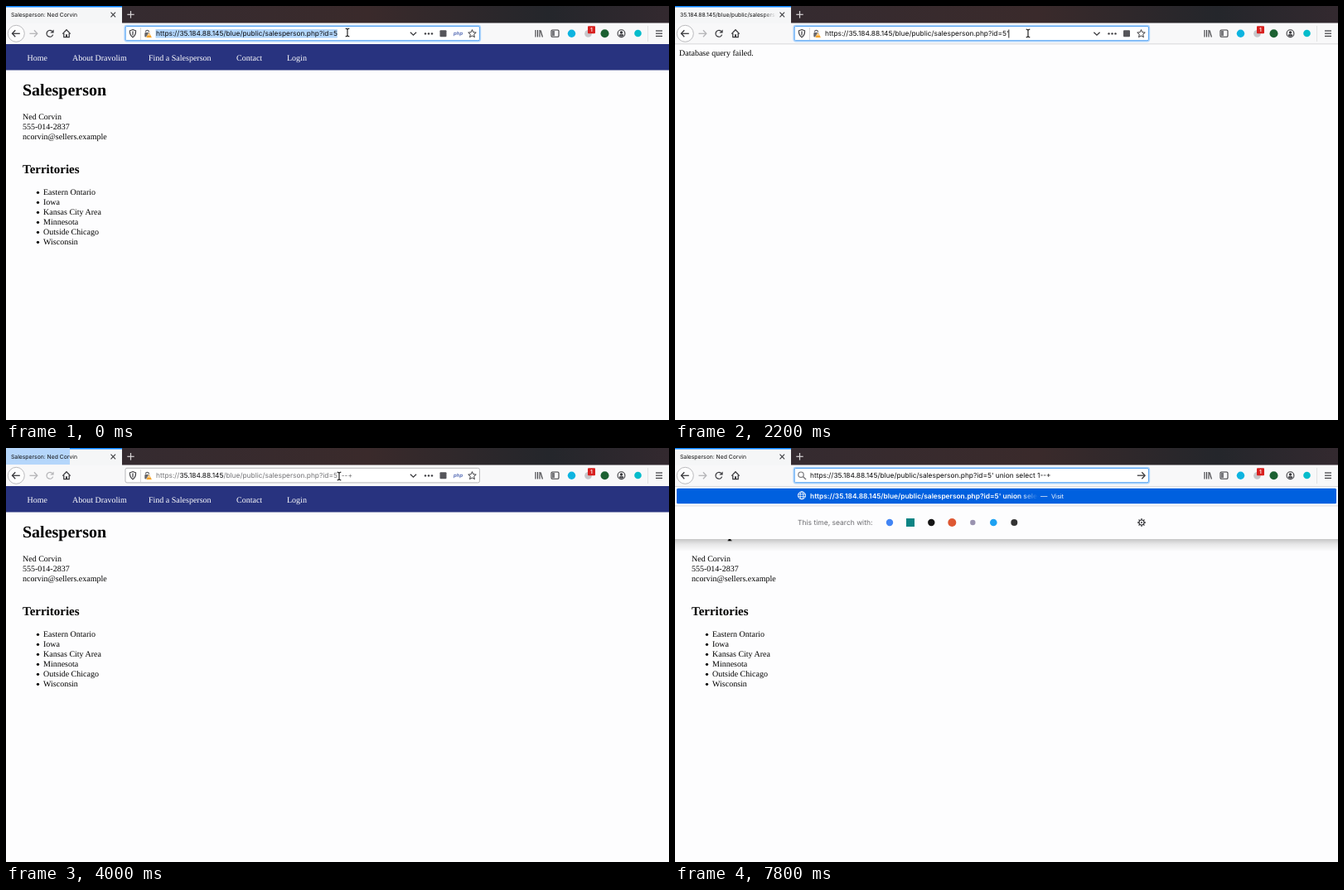
These frames come from a looping animation (800 px wide and 500 px high, 8 s). An HTML page with a canvas:

```html
<!DOCTYPE html>
<html lang="en">
<head>
<meta charset="utf-8">
<title>Browser session</title>
<style>
html, body { margin: 0; width: 100%; height: 100%; overflow: hidden; background: #fdfdfe; }
canvas { display: block; width: 100vw; height: 100vh; }
</style>
</head>
<body>
<canvas id="stage" width="800" height="500"></canvas>
<script>
const ctx = document.getElementById('stage').getContext('2d');
const LOOP = 8000, STEP = 200;
const SANS = 'Inter, sans-serif', SERIF = '"Liberation Serif", serif';
const INK = '#3a3a3e', URL_SIZE = 8.37;
const HOST = '35.184.88.145', PATH = '/blue/public/salesperson.php?id=5';
const BASE = 'https://' + HOST + PATH;
const PERSON = 'Ned Corvin';

// Each entry changes the state from its time on.
const EVENTS = [
  [0, { page: 'person', field: 'focus', tail: '', sel: true, caret: false, loading: false, burst: 0 }],
  [400, { sel: false, caret: true }],
  [800, { field: 'typing', tail: "'" }],
  [1000, { field: 'idle', loading: true }],
  [1400, { page: 'failed', loading: false, burst: 38 }],
  [1600, { burst: 77 }],
  [1800, { burst: 0, field: 'focus', sel: true, caret: false }],
  [2200, { sel: false, caret: true }],
  [2600, { field: 'typing', tail: "' " }],
  [2800, { tail: "' -" }],
  [3000, { tail: "' --" }],
  [3200, { tail: "' --+" }],
  [3400, { field: 'idle', loading: true }],
  [3800, { page: 'person', loading: false, burst: 38 }],
  [4000, { burst: 77 }],
  [4200, { burst: 0 }],
  [4400, { field: 'focus', caret: true }],
  [5200, { caret: false }],
  [5600, { caret: true }],
  [6000, { field: 'typing', caret: false }]
];

// time, x, y, shape
const MOUSE = [
  [0, 412, 32, 'beam'], [800, 0, 0, ''], [1400, 426, 33, 'beam'], [2600, 0, 0, ''],
  [3600, 364, 34, 'beam'], [3800, 384, 34, 'beam'], [4000, 402, 34, 'beam'],
  [4200, 409, 34, 'beam'], [4600, 410, 40, 'beam'], [4800, 410, 57, 'arrow'], [6000, 0, 0, '']
];

function stateAt(t) {
  const s = {};
  for (const [at, change] of EVENTS) if (at <= t) Object.assign(s, change);
  if (t >= 6000) {
    const count = Math.round(1 + 13 * (t - 6000) / 1800);
    s.tail = "' " + 'union select 1'.slice(0, count) + '--+';
  }
  return s;
}

function setFont(size, family = SANS, weight = 400) {
  ctx.font = `${weight} ${size}px ${family}`;
}
function text(str, x, y, size, color = '#0c0c0d', family = SANS, weight = 400) {
  setFont(size, family, weight);
  ctx.fillStyle = color;
  ctx.fillText(str, x, y);
  return ctx.measureText(str).width;
}
function rect(x, y, w, h, color) {
  ctx.fillStyle = color;
  ctx.fillRect(x, y, w, h);
}
function box(x, y, w, h, r, fill, stroke, width = 1) {
  ctx.beginPath();
  ctx.roundRect(x, y, w, h, r);
  paint(fill, stroke, width);
}
function circle(x, y, r, fill, stroke, width = 1) {
  ctx.beginPath();
  ctx.arc(x, y, r, 0, Math.PI * 2);
  paint(fill, stroke, width);
}
function path(points, stroke = INK, width = 1.2, fill) {
  ctx.beginPath();
  points.forEach(([x, y], i) => i ? ctx.lineTo(x, y) : ctx.moveTo(x, y));
  if (fill) ctx.closePath();
  paint(fill, stroke, width);
}
function paint(fill, stroke, width) {
  if (fill) { ctx.fillStyle = fill; ctx.fill(); }
  if (stroke) { ctx.strokeStyle = stroke; ctx.lineWidth = width; ctx.stroke(); }
}
function cross(x, y, r, color, width) {
  path([[x - r, y - r], [x + r, y + r]], color, width);
  path([[x + r, y - r], [x - r, y + r]], color, width);
}
function arrow(x, y, dir, color) {
  path([[x - 4.5 * dir, y], [x + 4.5 * dir, y]], color, 1.3);
  path([[x + dir, y - 4], [x + 4.8 * dir, y], [x + dir, y + 4]], color, 1.3);
}
function fade(x0, x1, y, h, rgb) {
  const g = ctx.createLinearGradient(x0, 0, x1, 0);
  g.addColorStop(0, `rgba(${rgb},0)`);
  g.addColorStop(1, `rgba(${rgb},1)`);
  rect(x0, y, x1 - x0, h, g);
}

function drawPage(s) {
  rect(0, 0, 800, 500, '#fdfdfe');
  if (s.page === 'failed') {
    text('Database query failed.', 5, 60, 10, '#000', SERIF);
    return;
  }
  rect(0, 46, 800, 31.5, '#28337f');
  const nav = [['Home', 25.5], ['About Dravolim', 80], ['Find a Salesperson', 172], ['Contact', 278], ['Login', 339]];
  for (const [label, x] of nav) text(label, x, 65.5, 10, '#fff', SERIF);
  text('Salesperson', 20, 108, 20, '#000', SERIF, 700);
  [PERSON, '555-014-2837', 'ncorvin@sellers.example'].forEach((line, i) =>
    text(line, 20, 137 + i * 12, 10, '#000', SERIF));
  text('Territories', 20, 202, 15, '#000', SERIF, 700);
  ['Eastern Ontario', 'Iowa', 'Kansas City Area', 'Minnesota', 'Outside Chicago', 'Wisconsin'].forEach((line, i) => {
    circle(38.5, 225.3 + i * 12, 1.6, '#000');
    text(line, 45, 228 + i * 12, 10, '#000', SERIF);
  });
}

function drawTabs(s, t) {
  const g = ctx.createLinearGradient(140, 0, 800, 0);
  g.addColorStop(0, '#352b30');
  g.addColorStop(0.45, '#3a2a2b');
  g.addColorStop(0.78, '#24262b');
  g.addColorStop(1, '#33292f');
  rect(0, 0, 800, 21, g);
  rect(0, 0, 140, 21, '#f5f6f7');
  rect(0, 0, 140, 1.5, '#0a84ff');
  if (s.burst) rect(0, 0, s.burst, 20, '#b5d6fb');
  const title = s.page === 'person' ? 'Salesperson: ' + PERSON : HOST + PATH;
  ctx.save();
  ctx.beginPath();
  ctx.rect(0, 2, 122, 18);
  ctx.clip();
  text(title, s.loading ? 19.5 : 6, 13.3, 6.8);
  fade(106, 122, 2, 18, '245,246,247');
  ctx.restore();
  if (s.loading) circle(10 + 4 * Math.cos((t - 3600) / 400 * Math.PI), 10.7, 1.3, INK);
  cross(129.3, 10.5, 2.8, INK, 1.1);
  path([[146.3, 10.3], [154.7, 10.3]], '#d8d4d5');
  path([[150.5, 6], [150.5, 14.6]], '#d8d4d5');
}

function drawNavButtons(s) {
  circle(12.3, 33.3, 10, '#fdfdfd', '#b4b4b7', 0.9);
  arrow(12.3, 33.3, -1, INK);
  arrow(33, 33.3, 1, '#b5b5b8');
  if (s.loading) {
    cross(53, 33.3, 3.7, '#555559', 1.2);
  } else {
    const color = s.burst ? '#b5b5b8' : INK;
    ctx.beginPath();
    ctx.arc(53, 33.3, 3.9, 0.35, 5.4);
    paint(null, color, 1.3);
    path([[57.6, 28.4], [57.6, 32.6], [53.4, 32.6]], null, 0, color);
  }
  path([[68.3, 33.6], [73, 28.8], [77.7, 33.6]], INK, 1.3);
  path([[69.8, 33], [69.8, 37.7], [76.2, 37.7], [76.2, 33]], INK, 1.3);
  rect(72, 34.3, 2, 3.4, INK);
}

function drawExtensions(s) {
  [639, 641.5, 644].forEach(x => path([[x, 29], [x, 37.5]], INK, 1.1));
  path([[645, 29.3], [647.4, 37.5]], INK, 1.1);
  box(658, 29, 9, 8.2, 1.3, null, INK, 1.1);
  rect(659, 30, 3, 6.2, '#77777b');
  circle(682.5, 33.2, 4.7, '#0db4e0');
  circle(702.5, 33.4, 4.3, '#c6c6ca');
  if (!s.loading) {
    box(702, 24.3, 9, 9, 1, '#d8201f');
    text('1', 705, 31.2, 6.6, '#fff', SANS, 600);
  }
  circle(722.5, 33.2, 5, '#1c6132');
  circle(742.5, 33.2, 4.4, null, INK, 1.1);
  circle(742.5, 32, 1.7, INK);
  box(739.8, 34.2, 5.4, 2.2, 1, INK);
  circle(762.5, 33, 4.3, '#06bccb');
  rect(774, 24, 0.8, 19, '#dcdcde');
  [30, 33.2, 36.4].forEach(y => path([[784, y], [792, y]], INK, 1.2));
}

function drawIdentity() {
  ctx.beginPath();
  ctx.moveTo(153, 28.6);
  ctx.lineTo(156.6, 29.8);
  ctx.quadraticCurveTo(156.8, 35.5, 153, 37.8);
  ctx.quadraticCurveTo(149.2, 35.5, 149.4, 29.8);
  ctx.closePath();
  paint(null, INK, 1.1);
  path([[153, 30.6], [153, 35.6]], INK, 1.2);
  rect(162.2, 26, 0.8, 15, '#d0d0d3');
  ctx.beginPath();
  ctx.arc(170.5, 31.4, 2, Math.PI, 0);
  paint(null, '#66666a', 1.2);
  box(167.3, 32, 6.2, 5.4, 1, '#66666a');
  path([[172.6, 32], [176.3, 38.3], [168.9, 38.3]], '#fff', 0.6, '#f59a13');
  rect(172.2, 34, 0.9, 2.2, '#fff');
}

function drawFieldActions(s) {
  const php = s.page === 'person' && !s.loading;
  const x = php ? 491.5 : 509;
  path([[x - 3.6, 31.7], [x, 35.2], [x + 3.6, 31.7]], INK, 1.3);
  const dots = php ? 510 : 527.5;
  [-4, 0, 4].forEach(d => circle(dots + d, 33.4, 1.2, INK));
  box((php ? 527.5 : 545) - 4, 29.3, 8, 8, 1, '#55555a');
  if (php) text('php', 540, 35, 6, '#4a62b0', SANS, 'italic 600');
  const star = Array.from({ length: 10 }, (_, i) => {
    const a = -Math.PI / 2 + i * Math.PI / 5, r = i % 2 ? 2.3 : 5;
    return [562.5 + r * Math.cos(a), 33.6 + r * Math.sin(a)];
  });
  path(star, INK, 1, '#fff');
}

function drawAddress(s) {
  const typing = s.field === 'typing';
  if (s.field === 'idle') {
    box(144, 24.3, 427.5, 17.6, 2, '#fff', '#b7b7ba', 1);
  } else {
    box(143.3, 23.7, 429, 18.8, 2.5, '#fff', 'rgba(69,161,255,.4)', 1.8);
    box(144.2, 24.5, 427.2, 17.2, 1.5, '#fff', '#55a3f2', 1);
  }
  const x = typing ? 163 : 181, y = 36.4;
  if (typing) {
    circle(152, 32.2, 3.2, null, '#77777b', 1.2);
    path([[154.4, 34.6], [158, 38]], '#77777b', 1.4);
    arrow(562.3, 33.2, 1, INK);
  } else {
    drawIdentity();
    drawFieldActions(s);
  }
  setFont(URL_SIZE);
  if (s.sel) rect(x - 0.5, 28, ctx.measureText(BASE + s.tail).width + 0.5, 10.6, '#b3d7fe');
  if (s.field === 'idle') {
    let pen = x;
    pen += text('https://', pen, y, URL_SIZE, '#737376');
    pen += text(HOST, pen, y, URL_SIZE);
    text(PATH + s.tail, pen, y, URL_SIZE, '#737376');
  } else {
    text(BASE + s.tail, x, y, URL_SIZE);
  }
  if (s.caret && s.field !== 'idle') {
    const before = typing || s.tail !== "' --+" ? s.tail : "' ";
    rect(x + ctx.measureText(BASE + before).width, 28.5, 0.9, 10, '#111');
  }
}

function globe(x, y, color) {
  circle(x, y, 4.5, null, color, 1);
  ctx.beginPath();
  ctx.ellipse(x, y, 2, 4.5, 0, 0, Math.PI * 2);
  paint(null, color, 0.8);
  path([[x - 4.3, y - 1.4], [x + 4.3, y - 1.4]], color, 0.8);
  path([[x - 4.3, y + 1.4], [x + 4.3, y + 1.4]], color, 0.8);
}

function suggestion(url, action, y, weight, color, actionColor) {
  globe(153, y - 0.7, color);
  setFont(8.4, SANS, weight);
  const width = Math.min(ctx.measureText(url).width, 274.5);
  ctx.save();
  ctx.beginPath();
  ctx.rect(163, y - 8, width + 0.5, 16);
  ctx.clip();
  text(url, 163, y + 3.1, 8.4, color, SANS, weight);
  if (width === 274.5) fade(415, 438, y - 8, 16, '0,96,223');
  ctx.restore();
  const x = 163 + width + 3.5;
  text('—', x, y + 3, 8.4, weight > 400 ? color : '#55555a');
  text(action, x + 13, y + 3, 7.4, actionColor);
}

function gear(x, y) {
  for (let i = 0; i < 8; i++) {
    const a = i * Math.PI / 4, c = Math.cos(a), n = Math.sin(a);
    path([[x + 3 * c, y + 3 * n], [x + 4.9 * c, y + 4.9 * n]], INK, 1.3);
  }
  circle(x, y, 3, null, INK, 1.2);
  circle(x, y, 1, INK);
}

function drawDropdown(s) {
  const two = s.tail === "' ";
  const bottom = two ? 128 : 110, engines = bottom - 20;
  const shade = ctx.createLinearGradient(0, bottom, 0, bottom + 15);
  shade.addColorStop(0, 'rgba(0,0,0,.22)');
  shade.addColorStop(0.4, 'rgba(0,0,0,.09)');
  shade.addColorStop(1, 'rgba(0,0,0,0)');
  rect(0, bottom, 800, 15, shade);
  rect(0, 46, 800, bottom - 46, '#fdfdfe');
  rect(0, 46, 800, 0.8, '#d0d0d3');
  box(2, 48.7, 796, 18.5, 1.5, '#0060df');
  suggestion(BASE + s.tail.trimEnd(), 'Visit', 58, 600, '#fff', '#fff');
  if (two) {
    box(134.5, 72.2, 7, 5, 0.7, '#66666a');
    rect(133, 77.7, 10, 1.2, '#66666a');
    suggestion(BASE + '%27', 'Switch to Tab', 76.5, 400, INK, '#00808f');
  }
  rect(0, bottom - 40.5, 800, 0.8, '#d4d4d8');
  text('This time, search with:', 148, engines + 3, 8.5, '#6b6b6f');
  circle(259, engines, 4.2, '#4285f4');
  box(279, engines - 5, 10, 10, 0, '#0c8484');
  circle(309.3, engines, 4.2, '#151515');
  circle(334.3, engines, 5, '#de5833');
  circle(359.3, engines, 3.2, '#9a93b0');
  circle(384.3, engines, 4.3, '#1da1f2');
  circle(409.3, engines, 4, '#333');
  gear(563, engines);
}

function drawMouse(t) {
  const [, x, y, shape] = MOUSE.filter(m => m[0] <= t).pop();
  if (shape === 'beam') {
    for (const [color, width] of [['#fff', 2.4], ['#111', 1.1]]) {
      path([[x, y - 4], [x, y + 4]], color, width);
      path([[x - 2.3, y - 5], [x, y - 4], [x + 2.3, y - 5]], color, width);
      path([[x - 2.3, y + 5], [x, y + 4], [x + 2.3, y + 5]], color, width);
    }
  } else if (shape === 'arrow') {
    const tip = [[0, 0], [0, 9], [2, 7.2], [3.5, 10.6], [5, 10], [3.6, 6.7], [6.3, 6.5]];
    path(tip.map(([dx, dy]) => [x + dx, y + dy]), '#fff', 0.8, '#111');
  }
}

function draw(t) {
  const s = stateAt(t);
  ctx.textRendering = 'geometricPrecision';
  drawPage(s);
  if (s.loading) {
    box(-3, 488.7, 154, 14, 2, '#f5f5f6', '#c4c4c7', 0.8);
    text('Waiting for ' + HOST + '...', 2.5, 497.2, 6.75);
  }
  drawTabs(s, t);
  rect(0, 20.5, 800, 25.5, '#f8f8f9');
  if (s.page === 'failed') rect(0, 45.5, 800, 0.8, '#cfcfd1');
  drawNavButtons(s);
  drawExtensions(s);
  drawAddress(s);
  if (s.field === 'typing') drawDropdown(s);
  drawMouse(t);
}

function tick() {
  const t = performance.now() % LOOP;
  draw(Math.floor(t / STEP) * STEP);
  requestAnimationFrame(tick);
}
tick();
</script>
</body>
</html>
```
